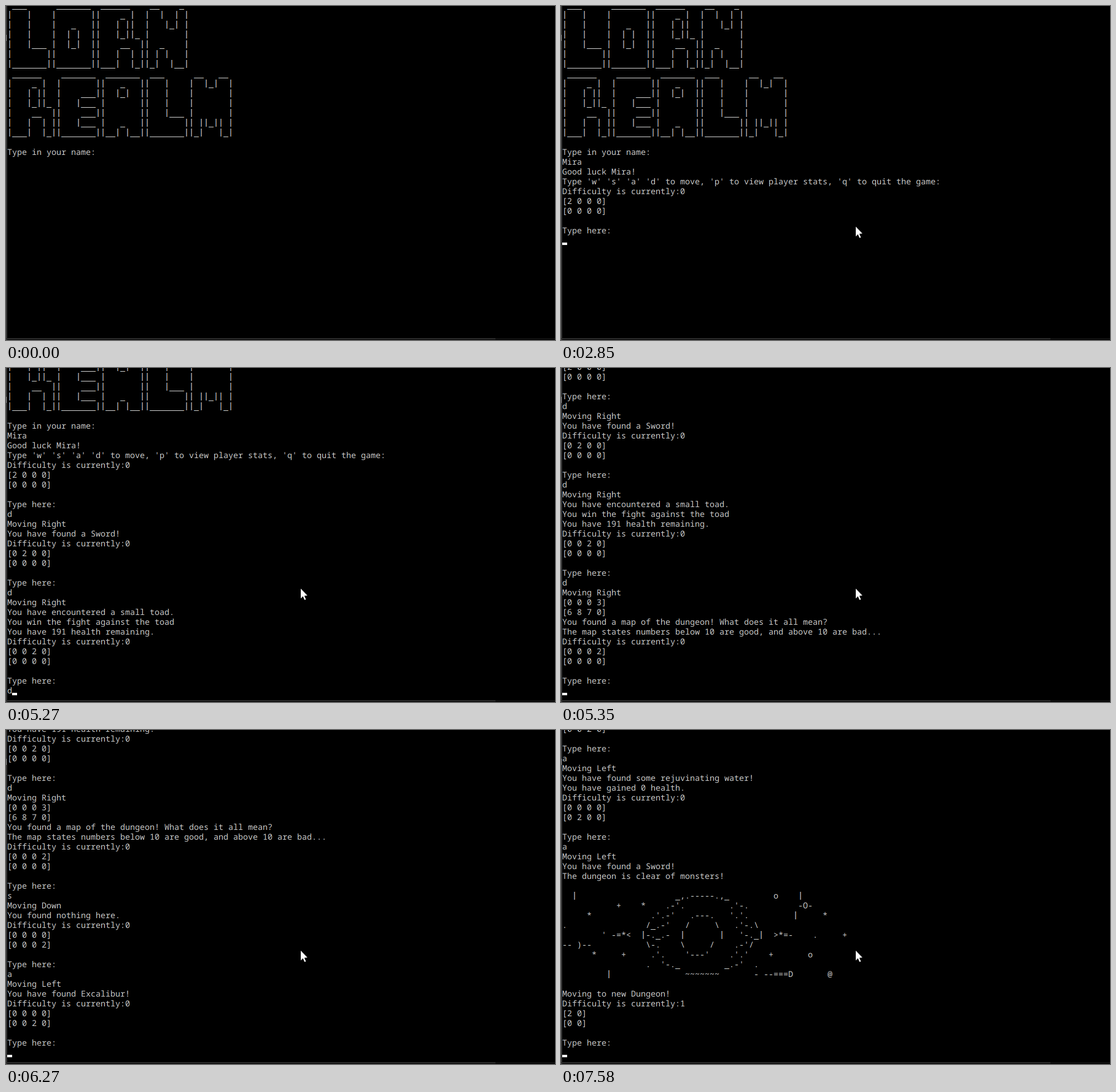
These frames come from a looping animation (894x545 px, 8000 ms). An HTML page with a canvas:

```html
<!DOCTYPE html>
<html lang="en">
<head>
<meta charset="utf-8">
<title>Dungeon console</title>
<style>
  html, body { margin: 0; width: 894px; height: 545px; overflow: hidden; background: #000; }
  canvas { display: block; }
</style>
</head>
<body>
<canvas id="stage" width="894" height="545"></canvas>
<script>
const ctx = document.getElementById('stage').getContext('2d');
const LOOP = 8000, LAST_ROW = 33, CELL_W = 8, CELL_H = 16, LEFT = 2;

// Each colour channel of the text sits a third of a pixel apart, as on an LCD.
const CHANNELS = [['#cc0000', 1 / 3], ['#00cc00', 0], ['#0000cc', -1 / 3]];

const title = String.raw`
 ___      _______  ______    __    _ 
|   |    |       ||    _ |  |  |  | |
|   |    |   _   ||   | ||  |   |_| |
|   |    |  | |  ||   |_||_ |       |
|   |___ |  |_|  ||    __  ||  _    |
|       ||       ||   |  | || | |   |
|_______||_______||___|  |_||_|  |__|
 ______    _______  _______  ___      __   __ 
|    _ |  |       ||   _   ||   |    |  |_|  |
|   | ||  |    ___||  |_|  ||   |    |       |
|   |_||_ |   |___ |       ||   |    |       |
|    __  ||    ___||       ||   |___ |       |
|   |  | ||   |___ |   _   ||       || ||_|| |
|___|  |_||_______||__| |__||_______||_|   |_|
`.slice(1);

// Each row alternates a column and the text that starts there.
const planet = [
  [2, '|', 23, '_,.-----.,_', 43, 'o', 48, '|'],
  [11, '+', 16, '*', 21, ".-'.", 34, ".'-.", 48, '-O-'],
  [5, '*', 18, ".'.-'", 26, '.---.', 34, "'.'.", 47, '|', 53, '*'],
  [0, '.', 17, "/_.-'", 25, '/', 31, '\\', 35, ".'-.\\"],
  [8, "'", 10, '-=*<', 16, '|-._.-', 24, '|', 32, '|', 36, "'-._|", 43, '>*=-', 51, '.', 57, '+'],
  [0, '-- )--', 17, '\\-.', 24, '\\', 30, '/', 35, ".-'/"],
  [6, '*', 12, '+', 18, ".'.", 25, "'---'", 34, ".'.'", 42, '+', 50, 'o'],
  [17, '.', 20, "'-._", 33, "_.-'", 39, '.'],
  [9, '|', 25, '~~~~~~~', 39, '-', 41, '--===D', 54, '@']
].map(parts => {
  let row = '';
  for (let i = 0; i < parts.length; i += 2) row = row.padEnd(parts[i]) + parts[i + 1];
  return row;
}).join('\n');

const prompt = (top, bottom, level = 0) =>
  `Difficulty is currently:${level}\n[${top}]\n[${bottom}]\n\nType here:\n`;
const move = (way, news, top, bottom) => `\nMoving ${way}\n${news}\n` + prompt(top, bottom);
const NONE = '0 0 0 0';

// [time, text added to the console, caret visible]
const events = [
  [0, title + '\nType in your name:\n', false],
  [290, '', true],
  [750, '', false],
  [1050, 'M', true],
  [1220, 'i', true],
  [1290, 'r', true],
  [1460, 'a', true],
  [1780, "\nGood luck Mira!\nType 'w' 's' 'a' 'd' to move, 'p' to view player stats, 'q' to quit the game:\n"
    + prompt('2 0 0 0', NONE), true],
  [2390, '', false],
  [2850, '', true],
  [3020, 'd', true],
  [3090, move('Right', 'You have found a Sword!', '0 2 0 0', NONE), true],
  [3950, 'd', true],
  [4020, move('Right', 'You have encountered a small toad.\nYou win the fight against the toad\n'
    + 'You have 191 health remaining.', '0 0 2 0', NONE), true],
  [4950, '', false],
  [5270, 'd', true],
  [5350, move('Right', '[0 0 0 3]\n[6 8 7 0]\nYou found a map of the dungeon! What does it all mean?\n'
    + 'The map states numbers below 10 are good, and above 10 are bad...', '0 0 0 2', NONE), true],
  [5810, 's', true],
  [5890, move('Down', 'You found nothing here.', NONE, '0 0 0 2'), true],
  [6270, 'a' + move('Left', 'You have found Excalibur!', NONE, '0 0 2 0'), true],
  [6730, 'a' + move('Left', 'You have found some rejuvinating water!\nYou have gained 0 health.',
    NONE, '0 2 0 0'), true],
  [7510, 'a', true],
  [7580, '\nMoving Left\nYou have found a Sword!\nThe dungeon is clear of monsters!\n\n' + planet
    + '\n\nMoving to new Dungeon!\n' + prompt('2 0', '0 0', 1), true]
];

// [time, x, y] of the mouse pointer
const pointerStops = [[70, 850, 500], [140, 700, 440], [220, 540, 385], [290, 480, 360]];

function rect(color, x, y, w, h) {
  ctx.fillStyle = color;
  ctx.fillRect(x, y, w, h);
}

function drawLine(line, row, color, shift) {
  const base = row * CELL_H + 3;
  [...line].forEach((char, col) => {
    const x = LEFT + col * CELL_W + shift;
    if (char === '|') rect(color, x + 3.4, base - 11, 1.2, 13);
    else if (char === '_') rect(color, x, base + 2, CELL_W, 1);
    else if (char !== ' ') {
      ctx.fillStyle = color;
      ctx.fillText(char, x, base);
    }
  });
}

function drawText(lines) {
  ctx.save();
  ctx.font = '13.333px "Noto Sans Mono", "DejaVu Sans Mono", monospace';
  ctx.textRendering = 'geometricPrecision';
  ctx.globalCompositeOperation = 'lighter';
  for (const [color, shift] of CHANNELS) {
    lines.forEach((line, row) => drawLine(line, row, color, shift));
  }
  ctx.restore();
}

function drawPointer(x, y) {
  ctx.save();
  ctx.translate(x, y);
  ctx.beginPath();
  [[0, 0], [0, 16], [3.5, 12.5], [6.2, 18.5], [8.4, 17.5], [5.8, 11.7], [10.8, 11.2]]
    .forEach(([px, py]) => ctx.lineTo(px, py));
  ctx.closePath();
  ctx.strokeStyle = '#000';
  ctx.stroke();
  ctx.fillStyle = '#fff';
  ctx.fill();
  ctx.restore();
}

function drawFrame() {
  rect('#333', 0, 0, 2, 545);
  rect('#888', 0, 47, 1, 10);
  rect('#2c2c2c', 0, 542, 797, 2);
  rect('#111', 797, 542, 97, 2);
}

function draw(t) {
  const past = events.filter(([time]) => time <= t);
  const lines = past.map(([, text]) => text).join('').split('\n').slice(-LAST_ROW - 1);
  const last = lines.length - 1;
  const caretOn = past[past.length - 1][2];

  rect('#000', 0, 0, 894, 545);
  drawText(lines);
  if (caretOn) rect('#fff', LEFT + lines[last].length * CELL_W, last * CELL_H + 2, CELL_W, 4);
  drawFrame();
  const stop = pointerStops.filter(([time]) => time <= t).pop();
  if (stop) drawPointer(stop[1], stop[2]);
}

const start = performance.now();
function tick() {
  draw((performance.now() - start) % LOOP);
  requestAnimationFrame(tick);
}
tick();
</script>
</body>
</html>
```
